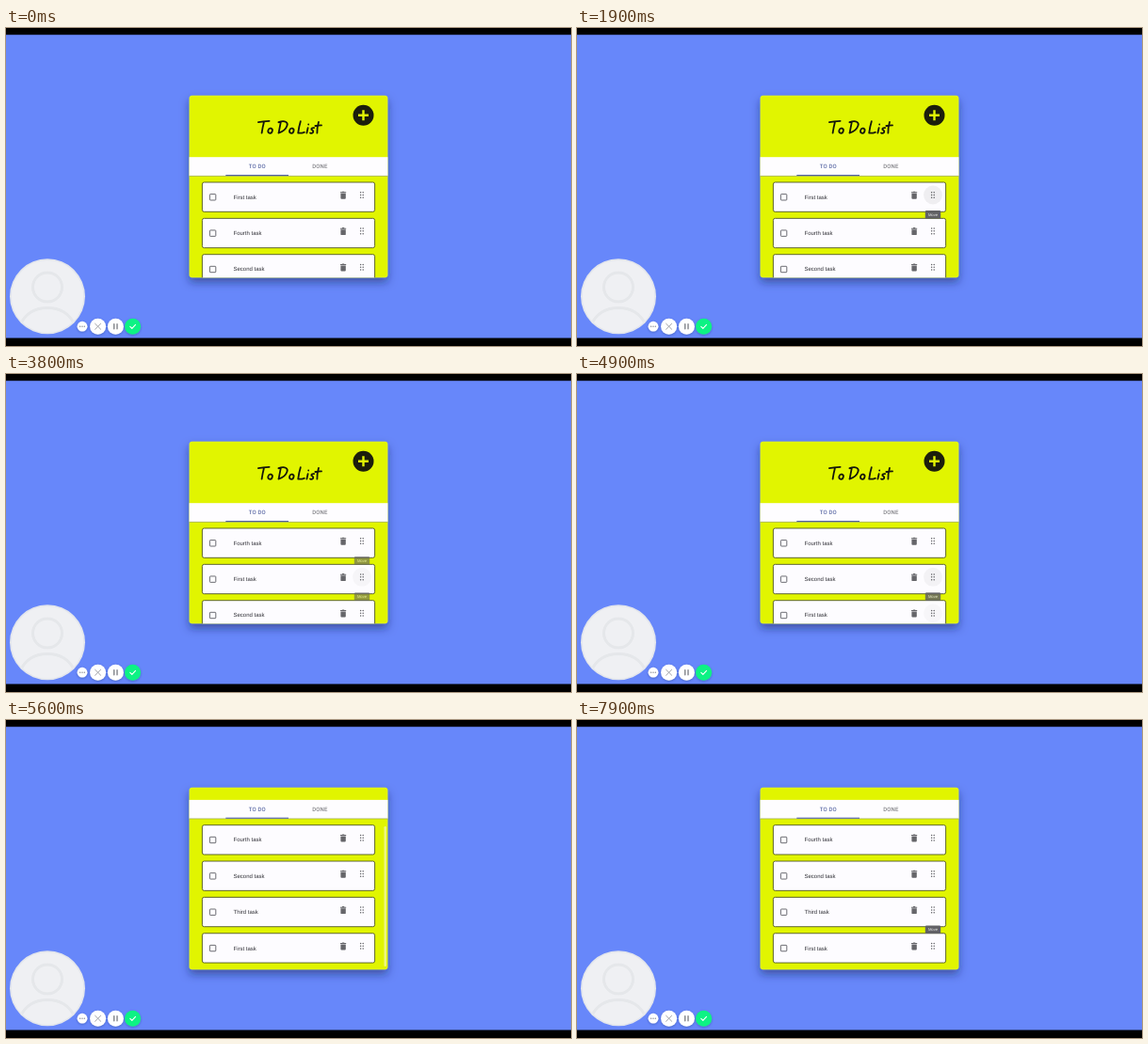
An HTML page that plays this animation: 600 px wide and 338 px high, repeating every 8000 ms.

```html
<!DOCTYPE html>
<html lang="en">
<head>
<meta charset="utf-8">
<title>To Do List</title>
<style>
  html, body { margin: 0; width: 100%; height: 100%; overflow: hidden; background: #000; }
  svg { display: block; width: 100%; height: 100%; }
  text { font-family: "Liberation Sans", Arial, sans-serif; text-rendering: geometricPrecision; }
  .tab { font: 500 6px Roboto, sans-serif; letter-spacing: .2px; text-anchor: middle; }
  .task { font-size: 6px; fill: #303036; }
  .tip { font-size: 4.2px; fill: #e8e8ea; text-anchor: middle; }
  .line { fill: none; stroke-linecap: round; stroke-linejoin: round; }
</style>
</head>
<body>
<svg viewBox="0 0 600 338">
  <defs>
    <filter id="lift" x="-20%" y="-20%" width="140%" height="145%">
      <feDropShadow dx="0" dy="5" stdDeviation="5" flood-color="#141c50" flood-opacity=".5"/>
    </filter>
    <filter id="soft" x="-30%" y="-30%" width="160%" height="160%">
      <feDropShadow dx="0" dy=".8" stdDeviation="1" flood-color="#1c2a70" flood-opacity=".4"/>
    </filter>
    <rect id="body" x="194.6" y="71.7" width="210.8" height="193.6" rx="3"/>
    <clipPath id="panel"><use href="#body"/></clipPath>
    <clipPath id="face"><circle cx="44" cy="285.3" r="38"/></clipPath>

    <g id="card">
      <rect x="208.4" y="164" width="183.2" height="31.3" rx="2" fill="#fdfcff" stroke="#3c4218" stroke-width=".8"/>
      <rect x="216.4" y="176.6" width="6.4" height="6.4" rx=".7" fill="none" stroke="#5c5c62" stroke-width=".9"/>
      <path d="M355 174.3h1.7l.5-.6h1.8l.5.6h1.7v1h-6.2zM355.4 175.8h5.4v5q0 .9-.9.9h-3.6q-.9 0-.9-.9z" fill="#66666a"/>
      <path class="line" d="M376.6 174.7v5.7M379.2 174.7v5.7" stroke="#606065" stroke-width="1.5" stroke-dasharray="0 2.8"/>
    </g>
    <circle id="halo" cx="378" cy="177.5" r="10" fill="#000" fill-opacity=".055"/>
    <g id="tip">
      <rect x="369.8" y="194" width="16.4" height="8.6" rx="1.4" fill="#616165"/>
      <text class="tip" x="378" y="199.8">Move</text>
    </g>
    <ellipse id="o" rx="2.2" ry="2.6" transform="rotate(18)"/>
  </defs>

  <rect y="7.2" width="600" height="322.3" fill="#6787fa"/>

  <use href="#body" fill="#e1f504" filter="url(#lift)"/>
  <g clip-path="url(#panel)">
    <g class="scroll">
      <g class="line" role="img" aria-label="To Do List" stroke="#15170a" stroke-width="1.8">
        <path d="M268 100.2Q273 99 279.6 98.8M274 99.8Q272.6 105 271.6 111.6"/>
        <use href="#o" x="280.6" y="109.2"/>
        <path d="M291.8 99.8L289.6 111.4M289.4 100.2C296 97.8 300 100 298.4 104Q296.6 109.4 289.4 111.6"/>
        <use href="#o" x="303.3" y="109.2"/>
        <path d="M312.8 99.2Q311 105 310.2 111.6Q313.4 112 316.8 110.8"/>
        <path d="M320.6 106.2L319.4 111.6M321.2 102.4v.1"/>
        <path d="M327.2 106.2Q323.8 105.8 324.4 107.9Q327 109.4 326 111Q324.6 112.4 323 111.4"/>
        <path d="M332 99.8Q330.2 106 330.4 111.6M328.4 104Q331.5 103.4 335 103.4"/>
      </g>
      <circle cx="379.5" cy="92.7" r="11" fill="#1c1e0c"/>
      <path d="M374 92.7h11M379.5 87.2v11" stroke="#e1f504" stroke-width="2.4"/>

      <rect x="194" y="137.2" width="212" height="20" fill="#fefdff"/>
      <rect x="194" y="156.9" width="212" height=".7" fill="#98a45c"/>
      <rect x="233.3" y="156" width="66.7" height="1.1" fill="#5261a4"/>
      <text class="tab" x="266.8" y="149.3" fill="#5c6aa6">TO DO</text>
      <text class="tab" x="333.4" y="149.3" fill="#808085">DONE</text>
      <g id="list"></g>
      <g id="halos"></g>
    </g>
    <rect id="bar" x="401.4" y="113" width="2.6" height="149" rx="1.3" fill="#f6f8cc"/>
  </g>
  <g class="scroll" id="tips"></g>

  <circle cx="44" cy="285.3" r="40" fill="#e3e6ec"/>
  <circle cx="44" cy="285.3" r="38.4" fill="#eff0f3"/>
  <g clip-path="url(#face)" fill="none" stroke="#e5e7ea" stroke-width="3">
    <circle cx="44" cy="275.5" r="15.5"/>
    <path d="M14 318Q22 297.5 44 297.5T74 318"/>
  </g>

  <g filter="url(#soft)" fill="#fff">
    <circle cx="81" cy="317.2" r="5.4"/>
    <circle cx="97.6" cy="317.2" r="8.5"/>
    <circle cx="116.4" cy="317.2" r="8.5"/>
    <circle cx="134.6" cy="317.2" r="8.5" fill="#10f284"/>
  </g>
  <g class="line">
    <path d="M78.7 317.2h4.7" stroke="#70727c" stroke-width="1.3" stroke-dasharray="0 2.3"/>
    <path d="M94.6 314.2l6 6M100.6 314.2l-6 6" stroke="#a0a2a8" stroke-width="1"/>
    <path d="M114.8 314.6v5.2M118 314.6v5.2" stroke="#6c6e76" stroke-width="1.2"/>
    <path d="M131.8 317.3l2 2 3.7-3.9" stroke="#fff" stroke-width="1.1"/>
  </g>
</svg>
<script>
const LOOP = 8000, PITCH = 38.35, SCROLL = 52.3;
const $ = id => document.getElementById(id);
const clamp = v => Math.min(1, Math.max(0, v));
const smooth = v => (v = clamp(v), v * v * (3 - 2 * v));
const ease = (t, from, to) => smooth((t - from) / (to - from));

// Fades in from `on`, starts to fade out at `off`.
const fade = (t, on, off, out = 200) => clamp((t - on) / 150) * clamp((off + out - t) / out);

// The first task is dragged down one slot at a time.
const dragged = t => ease(t, 2000, 2450) + ease(t, 4500, 4800) + ease(t, 5000, 5270);

// Each task below moves up once the dragged one is halfway past it.
const slotOf = (i, t) => i ? i - smooth((dragged(t) - i + .75) * 2) : dragged(t);

// A halo without a slot follows the dragged task.
const halos = [
  { on: 950, off: 2750 }, { on: 3730, off: 4780 }, { on: 5000, off: 5150 },
  { slot: 1, on: 4750, off: 4850 }, { slot: 2, on: 7550, off: 7680 }
];
const tips = [
  { slot: 0, on: 950, off: 1900 }, { slot: 0, on: 3700, off: 3790 },
  { slot: 1, on: 3710, off: 4400 }, { slot: 1, on: 4750, off: 4870 },
  { slot: 2, on: 7550, off: LOOP }
];

function add(parent, markup) {
  const g = document.createElementNS('http://www.w3.org/2000/svg', 'g');
  g.innerHTML = markup;
  return $(parent).appendChild(g);
}

const shift = (node, y) => node.setAttribute('transform', `translate(0 ${y.toFixed(2)})`);
const show = (node, alpha) => node.setAttribute('opacity', alpha.toFixed(3));

const tasks = ['First', 'Fourth', 'Second', 'Third'].map(name =>
  add('list', `<use href="#card"/><text class="task" x="241.5" y="181.8">${name} task</text>`));
$('list').append(tasks[0]);
for (const halo of halos) halo.node = add('halos', '<use href="#halo"/>');
for (const tip of tips) tip.node = add('tips', '<use href="#tip"/>');
const scrolled = document.querySelectorAll('.scroll');

function draw(t) {
  const top = -SCROLL * ease(t, 4980, 5300);
  scrolled.forEach(node => shift(node, top));
  tasks.forEach((node, i) => shift(node, slotOf(i, t) * PITCH));
  for (const { node, slot = dragged(t), on, off } of [...halos, ...tips]) {
    shift(node, slot * PITCH);
    show(node, fade(t, on, off));
  }
  show($('bar'), .7 * fade(t, 4980, 5550, 450));
}

const start = performance.now();
function tick() {
  draw((performance.now() - start) % LOOP);
  requestAnimationFrame(tick);
}
tick();
</script>
</body>
</html>
```
